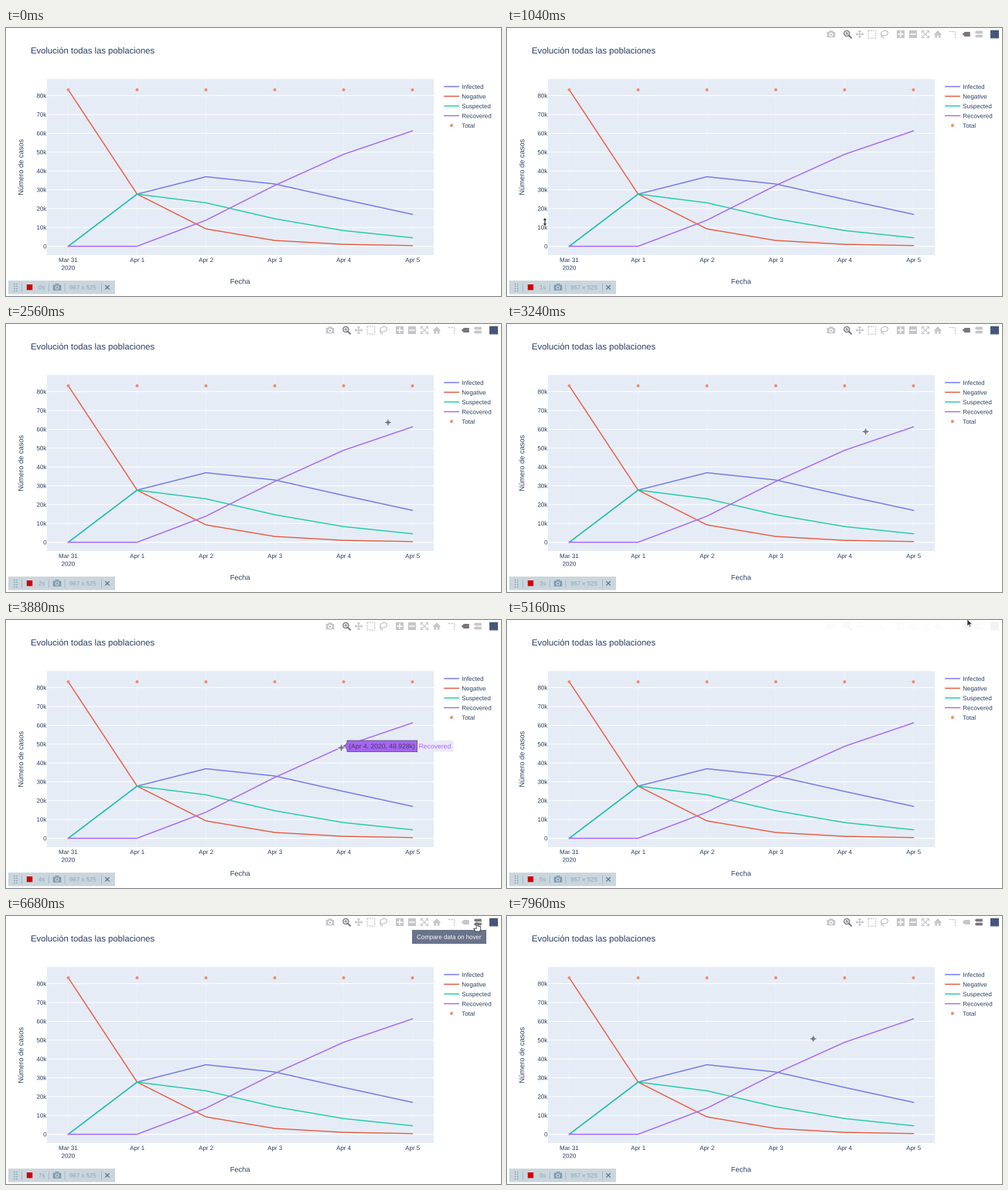
A matplotlib script for the animation above (8 s loop, 640 px wide and 347 px high).

```python
import numpy as np
import matplotlib.pyplot as plt
from matplotlib.animation import FuncAnimation
from matplotlib.patches import Circle, Ellipse, PathPatch, Polygon, Rectangle
from matplotlib.textpath import TextPath
from matplotlib.transforms import Affine2D

W, H, DPI = 640, 347, 64
PX = 72 / DPI
STEP, LOOP = 40, 8000
ZOOM = W / 967  # screen pixels to stage pixels

plt.rcParams.update({"font.family": "Liberation Sans", "path.snap": False,
                     "toolbar": "None"})
fig = plt.figure(figsize=(W / DPI, H / DPI), dpi=DPI, facecolor="white")
ax = fig.add_axes([0, 0, 1, 1])
ax.set(xlim=(0, W), ylim=(H, 0))
ax.axis("off")

INK = "#2a3f5f"
PALE, DARK = "#c6c6c8", "#7b757b"
PURPLE = "#a566f0"
LABEL = 12 * ZOOM


def glyphs(s, size, ha="left"):
    path = TextPath((0, 0), s, size=size)
    box = path.get_extents()
    dx = {"left": 0, "center": -(box.x0 + box.x1) / 2, "right": -box.x1}[ha]
    return Affine2D().translate(dx, 0).transform_path(path)


def text(x, y, s, size=LABEL, color=INK, ha="left", z=5, turn=0):
    """Outline text on baseline y, placed with sub-pixel precision."""
    place = Affine2D().scale(1, -1).rotate_deg(turn).translate(x, y)
    return ax.add_patch(PathPatch(glyphs(s, size, ha), fc=color, lw=0, zorder=z,
                                  transform=place + ax.transData))


def rect(x0, y0, x1, y1, color, z=3, **kw):
    kw.setdefault("lw", 0)
    return ax.add_patch(Rectangle((x0, y0), x1 - x0, y1 - y0, fc=color, zorder=z, **kw))


def line(xs, ys, color, w=1.0, z=3, **kw):
    return ax.plot(xs, ys, color=color, lw=w * PX, zorder=z, **kw)[0]


def poly(pts, color, z=3, **kw):
    kw.setdefault("lw", 0)
    return ax.add_patch(Polygon(pts, closed=True, fc=color, zorder=z, **kw))


def disc(x, y, r, color, z=3):
    return ax.add_patch(Circle((x, y), r, fc=color, lw=0, zorder=z))


def plus(x, y, r, color, w, **kw):
    return [line([x - r, x + r], [y, y], color, w, **kw),
            line([x, x], [y - r, y + r], color, w, **kw)]


# Chart
DAYS = 80.5 + 89 * np.arange(6)
TOTAL = 83.1


def epidemic():
    """Each day 2/3 of the negatives leave, half of them infected, half suspected;
    half of the suspected fall ill and half of the infected recover."""
    state = np.array([0, TOTAL, 0, 0])
    days = [state]
    for _ in DAYS[1:]:
        inf, neg, sus, rec = state
        state = np.array([inf / 2 + neg / 3 + sus / 2, neg / 3,
                          sus / 2 + neg / 3, rec + inf / 2])
        days.append(state)
    return np.transpose(days)


def val_y(k):
    return 282.6 - 2.4375 * k


def draw_chart():
    rect(53, 66.2, 553, 294, "#e5ecf6", z=1)
    for i, x in enumerate(DAYS):
        line([x, x], [66.2, 294], "white", ZOOM, 2, alpha=0.4)
        text(x, 303, f"Apr {i}" if i else "Mar 31", ha="center")
        disc(x, val_y(TOTAL), 2, "#ef8d72", 5)
    for k in range(0, 90, 10):
        y = val_y(k)
        line([53, 553], [y, y], "white", 1 if k else 2 * ZOOM, 2)
        text(52.3, y + 2.8, f"{k}k" if k else "0", ha="right")
    text(DAYS[0], 313.2, "2020", ha="center")

    names = ["Infected", "Negative", "Suspected", "Recovered", "Total"]
    colors = ["#7075e6", "#e65c42", "#1fcca2", PURPLE]
    for i, name in enumerate(names):
        y = 75.8 + 19 * ZOOM * i
        text(589.3, y + 3, name)
        if name == "Total":
            disc(576, y, 2, "#ef8d72")
    for i, (color, vals) in enumerate(zip(colors, epidemic())):
        y = 75.8 + 19 * ZOOM * i
        line(DAYS, val_y(vals), color, 1.4, 4, solid_joinstyle="round")
        line([566.2, 586.1], [y, y], color, 1.4, solid_capstyle="butt")

    text(32, 33, "Evolución todas las poblaciones", 17 * ZOOM)
    text(303, 331.3, "Fecha", 14 * ZOOM, ha="center")
    text(22.3, 180, "Número de casos", 14 * ZOOM, ha="center", turn=-90)


def camera(x, y, color, bg):
    rect(x - 5.3, y - 3, x + 5.3, y + 4.2, color, 5)
    rect(x - 2.4, y - 4.6, x + 2.4, y - 3, color, 5)
    disc(x, y + 0.6, 2.6, bg, 6)
    disc(x, y + 0.6, 1.4, color, 7)


# Screen recorder strip
def draw_recorder():
    bg, fg = "#cad6dd", "#8aa5b5"
    rect(3, 327, 141, 344.5, bg, 2)
    for i in range(8):
        disc(10.8 + 3 * (i % 2), 331.4 + 3 * (i // 2), 0.75, "#7d97a7")
    for x in (20.5, 55.5, 76, 123.5):
        line([x, x], [331, 341], "#9db2bf", 0.8)
    rect(26.8, 332, 34.2, 339.3, "#d00000", 4)
    camera(66, 335.6, "#7f9caf", bg)
    text(82, 338.5, "967 x 525", LABEL, fg)
    for d in (-2.3, 2.3):
        line([128.7, 133.3], [335.8 - d, 335.8 + d], "#5c7b90", 1.3)
    return text(42, 338.5, "0s", LABEL, fg)


# Chart toolbar
def tag(x, y, h):
    return [(x, y), (x + h, y - h), (x + 10, y - h), (x + 10, y + h), (x + h, y + h)]


def draw_modebar():
    c = 8
    outline = dict(fc="none", zorder=3, lw=1.3 * PX)
    camera(419, c, PALE, "white")

    ax.add_patch(Circle((439.3, 7), 3.5, ec=DARK, **outline))
    line([442, 445], [9.7, 12.6], DARK, 2)
    plus(439.3, 7, 1.5, DARK, 1)

    plus(456, c, 4, PALE, 1.3)
    for a in range(0, 360, 90):
        spin = Affine2D().rotate_deg(a).translate(456, c)
        poly(spin.transform([(5.4, 0), (2.8, -2.2), (2.8, 2.2)]), PALE)

    ax.add_patch(Rectangle((467, 3.2), 9.8, 9.8, ec=PALE, ls=(0, (1.4, 1)), **outline))
    ax.add_patch(Ellipse((488, 6.8), 9.2, 6.4, angle=-15, ec=PALE, **outline))
    line([484.5, 484, 486.5], [9, 11, 13], PALE, 1.3)

    for x in (509, 525):
        rect(x - 5, c - 5, x + 5, c + 5, PALE)
        line([x - 3, x + 3], [c, c], "white", 1.5, 4)
    line([509, 509], [c - 3, c + 3], "white", 1.5, 4)

    for s in (-1, 1):
        line([537.5, 544.5], [c - 3.5 * s, c + 3.5 * s], PALE, 1.1)
        for v in (-1, 1):
            x, y = 541 + 4.5 * s, c + 4.5 * v
            line([x - 2.5 * s, x, x], [y, y, y - 2.5 * v], PALE, 1.1)

    poly([(551.8, 8.6), (557, 3.2), (562.2, 8.6)], PALE)
    rect(553.4, 8, 560.6, 12.6, PALE)
    rect(556, 9.6, 558, 12.6, "white", 4)

    line([572, 579.5, 579.5], [4.5, 4.5, 13], PALE, 1.2, ls=(0, (2, 1)))

    near = [poly(tag(588.8, c, 3), DARK)]
    both = [poly(tag(604.8, c + d, 1.8), PALE) for d in (-2.5, 2.5)]
    rect(625, 2.8, 636, 13.4, "#45567a")
    return near, both, rect(405, 0, W, 17, "white", 8)


def draw_tooltip():
    box = "#69738a"
    return [poly([(606, 18.5), (610, 14), (614, 18.5)], box, 9),
            rect(525, 18, 621, 36, box, 9),
            text(573, 29.8, "Compare data on hover", LABEL, "white", "center", 10)]


HOT = np.array([DAYS[4], val_y(48.928)])


def draw_hover():
    x, y = HOT
    size, r = 13 * ZOOM, 7.3
    return [rect(532, y - r, 578.5, y + r, "#eceafa", 9),
            poly([(x + 0.5, y), (441, y - 4), (441, y - r), (531.7, y - r),
                  (531.7, y + r), (441, y + r), (441, y + 4)], PURPLE, 9,
                 ec="#444444", lw=ZOOM * PX),
            text(443.2, y + 3, "(Apr 4, 2020, 48.928k)", size, "#4c3a66", z=10),
            text(533.7, y + 3, "Recovered", size, PURPLE, z=10)]


# Pointer shapes, all drawn around their hot spot
shift = Affine2D()


def draw_pointers():
    kw = dict(z=20, transform=shift + ax.transData)
    grey, black = "#5a606c", "#2f3038"
    cross = (plus(0, 0, 3.8, "white", 2.6, **kw) + plus(0, 0, 3.6, grey, 1.1, **kw)
             + [rect(-1.6, -1.6, 1.6, 1.6, "none", ec=grey, lw=0.6 * PX, **kw)])
    resize = [line([0, 0], [-3, 3], black, 1.2, **kw)]
    resize += [poly([(0, 5 * s), (-2.2, 2.2 * s), (2.2, 2.2 * s)], black, **kw)
               for s in (-1, 1)]
    arrow = [poly([(0, 0), (0, 9), (2.1, 7.1), (3.6, 10.3), (5, 9.7), (3.6, 6.6), (6.4, 6.4)],
                  black, ec="white", lw=0.6 * PX, **kw)]
    hand = [poly([(-0.9, 0), (0.9, 0), (0.9, 4), (4.8, 5), (4.8, 8), (3.6, 11),
                  (-2, 11), (-4.4, 7), (-0.9, 7.4)],
                 "white", ec=black, lw=0.8 * PX, **kw)]
    return {"cross": cross, "resize": resize, "arrow": arrow, "hand": hand}


# Pointer stops: departure, arrival, place
START = (22, 352)
STOPS = [
    (280, 880, (49, 251)),
    (1080, 2240, (494, 127.5)),
    (2600, 3880, (433.5, 165.5)),
    (4720, 5160, (595, -1)),
    (5200, 5640, (609, 9)),
    (6760, 7400, (396, 159)),
]
CLICK = 6360


def pointer_at(t):
    """Eased moves along arcs that bulge upwards."""
    pos = np.array(START, float)
    for t0, t1, goal in STOPS:
        u = np.clip((t - t0) / (t1 - t0), 0, 1)
        u = u * u * (3 - 2 * u)
        way = np.array(goal) - pos
        pos = pos + u * way - (0, 0.4 * u * (1 - u) * np.hypot(*way))
        if u < 1:
            break
    return pos


def pointer_kind(x, y):
    if 66 < y < 294 and 32 < x < 553:
        return "cross" if x > 53 else "resize"
    return "hand" if x > 604 and 7 < y < 16 else "arrow"


def ramp(t, start):
    return np.clip((t - start) / 300, 0, 1)


def show(artists, on):
    for a in artists:
        a.set_visible(bool(on))


def tint(artists, on):
    for a in artists:
        a.set_facecolor(DARK if on else PALE)


draw_chart()
clock = draw_recorder()
near, both, veil = draw_modebar()
tooltip, hover = draw_tooltip(), draw_hover()
pointers = draw_pointers()


def update(i):
    t = i * STEP
    pos = pointer_at(t)
    kind = pointer_kind(*pos)
    shift.clear().translate(*pos)
    for name, parts in pointers.items():
        show(parts, name == kind)

    veil.set_alpha(1 - ramp(t, 280) + ramp(t, 4880) - ramp(t, 5360))
    compare = t >= CLICK
    show(tooltip, kind == "hand")
    show(hover, not compare and np.hypot(*(pos - HOT)) < 20 * ZOOM)
    tint(near, not compare)
    tint(both, compare or kind == "hand")
    clock.set_path(glyphs(f"{(t + 360) // 1000}s", LABEL))
    return []


anim = FuncAnimation(fig, update, frames=LOOP // STEP, interval=STEP,
                     repeat=True, repeat_delay=0, blit=False)
plt.show()
```
